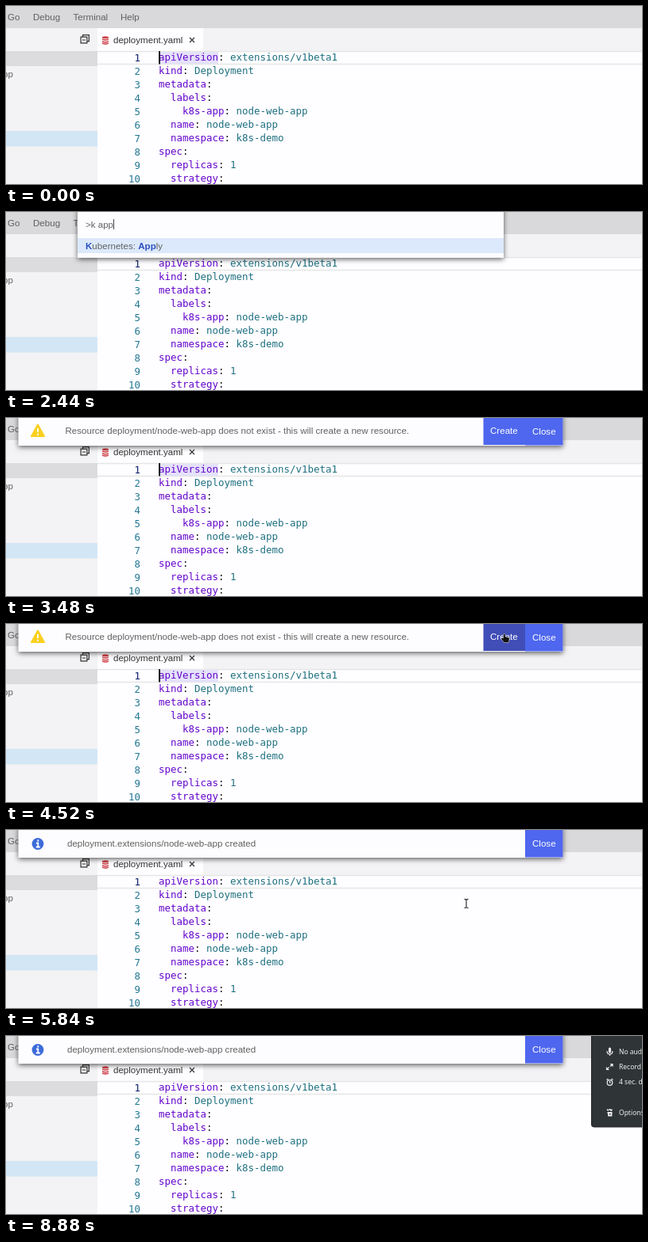
Recreate the animation shown at these times as an HTML page. Size 800 by 225 pixels, loop 8.92 s.

```html
<!DOCTYPE html>
<html lang="en">
<head>
<meta charset="utf-8">
<style>
html, body { margin: 0; width: 100%; height: 100%; overflow: hidden; }
svg { display: block; width: 800px; height: 225px; }
text { font: 11.57px "Liberation Sans", Arial, sans-serif; fill: #616161; white-space: pre; }
#code text { font: 12.46px "DejaVu Sans Mono", monospace; fill: #111; }
#code .key { fill: #6305cb; }
#code .value { fill: #1e7180; }
#code .number { fill: #237893; text-anchor: end; }
#code .current { fill: #0b216f; }
#rows .hit { fill: #2b4fc0; font-weight: bold; }
.button { fill: #4e67ee; }
.button.hover { fill: #414eb7; }
.label { fill: #fff; }
#panel text { font: 8.5px "Noto Sans", sans-serif; fill: #f0f0f0; }
#panel .icon { fill: none; stroke: #eee; stroke-width: 1.2; }
.shadow { filter: drop-shadow(0 2px 3px #0009); }
</style>
</head>
<body>
<svg viewBox="0 0 800 225">
  <rect width="800" height="225" fill="#fefdff"/>
  <rect width="800" height="28" fill="#d9d8da"/>
  <rect y="28" width="800" height="29" fill="#f3f2f4"/>
  <rect y="57" width="115" height="168" fill="#f3f2f4"/>
  <rect y="57" width="115" height="19" fill="#dcdbdd"/>
  <rect y="158" width="115" height="19.5" fill="#d3e6f6"/>
  <rect x="115" y="28" width="133" height="29" fill="#fefdff"/>
  <text x="2" y="18">Go</text>
  <text x="34" y="18">Debug</text>
  <text x="84.5" y="18">Terminal</text>
  <text x="144" y="18">Help</text>
  <text x="-4" y="90">pp</text>
  <g fill="#f3f2f4" stroke="#333" stroke-width="1.2">
    <path d="M96.6 36.6h7.8v8h-7.8z"/>
    <path d="M94.1 39.1h7.8v7.8h-7.8zM96 43h4"/>
  </g>
  <g fill="#cc3e44">
    <ellipse cx="125" cy="39.8" rx="4" ry="1.5"/>
    <path id="disc" d="M121 41.3q4 2 8 0v1.5q-4 2 -8 0z"/>
    <use href="#disc" y="2.6"/>
    <use href="#disc" y="5"/>
  </g>
  <text x="135" y="47" style="fill:#333">deployment.yaml</text>
  <path d="M231 40l6 6m0-6l-6 6" stroke="#333" stroke-width="1.2"/>

  <path d="M115 57.5h685M115 73.5h685" stroke="#e6e5e7" stroke-width="1.5"/>
  <rect id="word" x="192" y="58" width="75" height="15" fill="#e5e2fb"/>
  <g id="code"></g>
  <rect id="caret" x="192.2" y="57" width="1.7" height="16.5" fill="#000"/>

  <g id="palette">
    <rect id="box" class="shadow" x="90" y="-5" width="536" fill="#fdfcff"/>
    <rect x="90" y="33" width="536" height="19" fill="#dce9fc"/>
    <text id="query" x="100" y="19.5"></text>
    <rect id="bar" y="9" width="1" height="13" fill="#444"/>
    <g id="rows"></g>
  </g>

  <g id="notice">
    <rect class="shadow" x="15.5" y="-5" width="685" height="40" fill="#fdfcfe"/>
    <g id="warning">
      <path d="M40 8.5l8 14.5h-16z" fill="#fad01f" stroke="#fad01f" stroke-width="2" stroke-linejoin="round"/>
      <path d="M40 13v5m0 1.7v2" stroke="#fff" stroke-width="2"/>
      <text x="74.5" y="20">Resource deployment/node-web-app does not exist - this will create a new resource.</text>
      <rect id="create" class="button" x="600.5" width="52.5" height="34"/>
      <text class="label" x="609" y="20">Create</text>
    </g>
    <g id="info">
      <circle cx="40" cy="17.5" r="7.4" fill="#3d6bd9"/>
      <path d="M40.3 12.3v2.3M38 16.5h2.3v5m-2.5 0h5" stroke="#fff" stroke-width="1.8" fill="none"/>
      <text x="77" y="21">deployment.extensions/node-web-app created</text>
    </g>
    <rect class="button" x="653" width="47.5" height="34.5"/>
    <text class="label" x="662" y="20.5">Close</text>
  </g>

  <g id="panel">
    <path d="M736.5 -2v114q0 3 3 3h65v-117z" fill="#2f3436" stroke="#202426"/>
    <text x="771" y="23">No audio</text>
    <text x="771" y="42">Record area</text>
    <text x="771" y="61">4 sec. delay</text>
    <text x="771" y="99.5">Options</text>
    <g class="icon">
      <path d="M759.5 16v4" stroke-width="3.2" stroke-linecap="round"/>
      <path d="M756 19q0 4 3.5 4t3.5-4M759.5 23v2"/>
      <path d="M760 35.5h3v3m0-3l-3 3M758.500 42.500h-3v-3m0 3l3-3"/>
      <circle cx="759.500" cy="59" r="3.300"/>
      <path d="M759.500 57v2h1.500M755.500 55.500l2-1.500m4 0l2 1.500"/>
      <path d="M756.500 97h6M758 97v3.500h3.500v-3.500M756 93l2 1m1.500-2v2m3-1l-2 1.500" stroke-width="1.800"/>
    </g>
  </g>

  <g id="mouse">
    <path id="hand" d="M-1.500 1v-5q1.300-1.500 2.500 0v3l4.500 1q1 .5 .6 2.500l-1 4h-5.500l-4-5q0-1.500 1.500-1z" fill="#111" stroke="#eee" stroke-width=".5"/>
    <path id="beam" d="M-2.500-5.500q2 0 2.500 1q.5-1 2.500-1M0-5v10M-2.500 5.500q2 0 2.500-1q.5 1 2.500 1" fill="none" stroke="#444" stroke-width="1.300"/>
  </g>
</svg>
<script>
const LOOP = 8920;
const $ = id => document.getElementById(id);
const show = (id, on) => { $(id).style.display = on ? '' : 'none'; };

const yaml = `apiVersion: extensions/v1beta1
kind: Deployment
metadata:
  labels:
    k8s-app: node-web-app
  name: node-web-app
  namespace: k8s-demo
spec:
  replicas: 1
  strategy:`;
$('code').innerHTML = yaml.split('\n').map((line, i) => {
  const [key, value] = line.split(':');
  const y = 69 + i * 17;
  return `<text class="number ${i ? '' : 'current'}" x="169" y="${y + .5}">${i + 1}</text>
    <text x="192" y="${y}"><tspan class="key">${key}</tspan>:<tspan class="value">${value}</tspan></text>`;
}).join('');

const commands = [
  'About', 'Close All Tabs', 'Close Tab', 'Collapse All Side Panels', 'Debug: Start Debugging',
  'File: New File', 'File: Open...', 'File: Save', 'Git: Commit', 'Go to Line...',
  ...['Add Existing Cluster', 'Apply', 'Create', 'Create Cluster', 'Debug (Launch)', 'Delete',
    'Describe', 'Diff', 'Explain', 'Expose', 'Get', 'Load', 'Logs'].map(name => 'Kubernetes: ' + name)
];
const typing = [[760, ''], [1360, 'k'], [1640, 'k '], [2000, 'k a'], [2080, 'k ap'], [2200, 'k app']];

let lastQuery = null;
function setQuery(query) {
  if (query === lastQuery) return;
  lastQuery = query;
  const [first, second = ''] = query.split(' ');
  const pattern = new RegExp(`^(${first})(.*?\\b)(${second})(.*)$`, 'i');
  const found = commands.filter(name => pattern.test(name)).slice(0, 10);
  $('rows').innerHTML = found.map((name, i) => `<text x="100" y="${46.5 + i * 19.4}">` + name.replace(pattern,
    '<tspan class="hit">$1</tspan>$2<tspan class="hit">$3</tspan>$4') + '</text>').join('');
  $('box').setAttribute('height', 43.5 + found.length * 19.4);
  $('query').textContent = '>' + query;
  $('bar').setAttribute('x', 100 + $('query').getComputedTextLength());
}

// time, x, y
const path = [[4200, 598, 235], [4480, 627, 17], [5240, 627, 17], [5600, 579, 93], [5960, 579, 93], [6300, 562, 240]];
function mouseAt(t) {
  const i = path.findIndex(p => p[0] > t);
  if (i < 1) return null;
  const [a, b] = [path[i - 1], path[i]];
  const u = (t - a[0]) / (b[0] - a[0]), ease = u * u * (3 - 2 * u);
  return [a[1] + (b[1] - a[1]) * ease, a[2] + (b[2] - a[2]) * ease];
}

function render(t) {
  const open = t >= 760 && t < 2960;
  show('palette', open);
  if (open) setQuery(typing.findLast(step => step[0] <= t)[1]);

  const focused = !open && t < 5000;
  show('word', focused);
  show('caret', focused && (t < 760 ? t < 400 : (t - 3040) % 1000 < 500));

  const warning = t >= 3240 && t < 5120, info = t >= 5200;
  show('notice', warning || info);
  show('warning', warning);
  show('info', info);

  const mouse = mouseAt(t);
  show('mouse', mouse);
  if (mouse) $('mouse').setAttribute('transform', `translate(${mouse})`);
  const over = mouse && mouse[1] < 34;
  show('hand', over);
  show('beam', !over);
  $('create').classList.toggle('hover', !!over);

  $('panel').style.opacity = Math.min(1, Math.max(0, (t - 8440) / 160));
}

const start = performance.now();
function tick() {
  render((performance.now() - start) % LOOP);
  requestAnimationFrame(tick);
}
tick();
</script>
</body>
</html>
```
